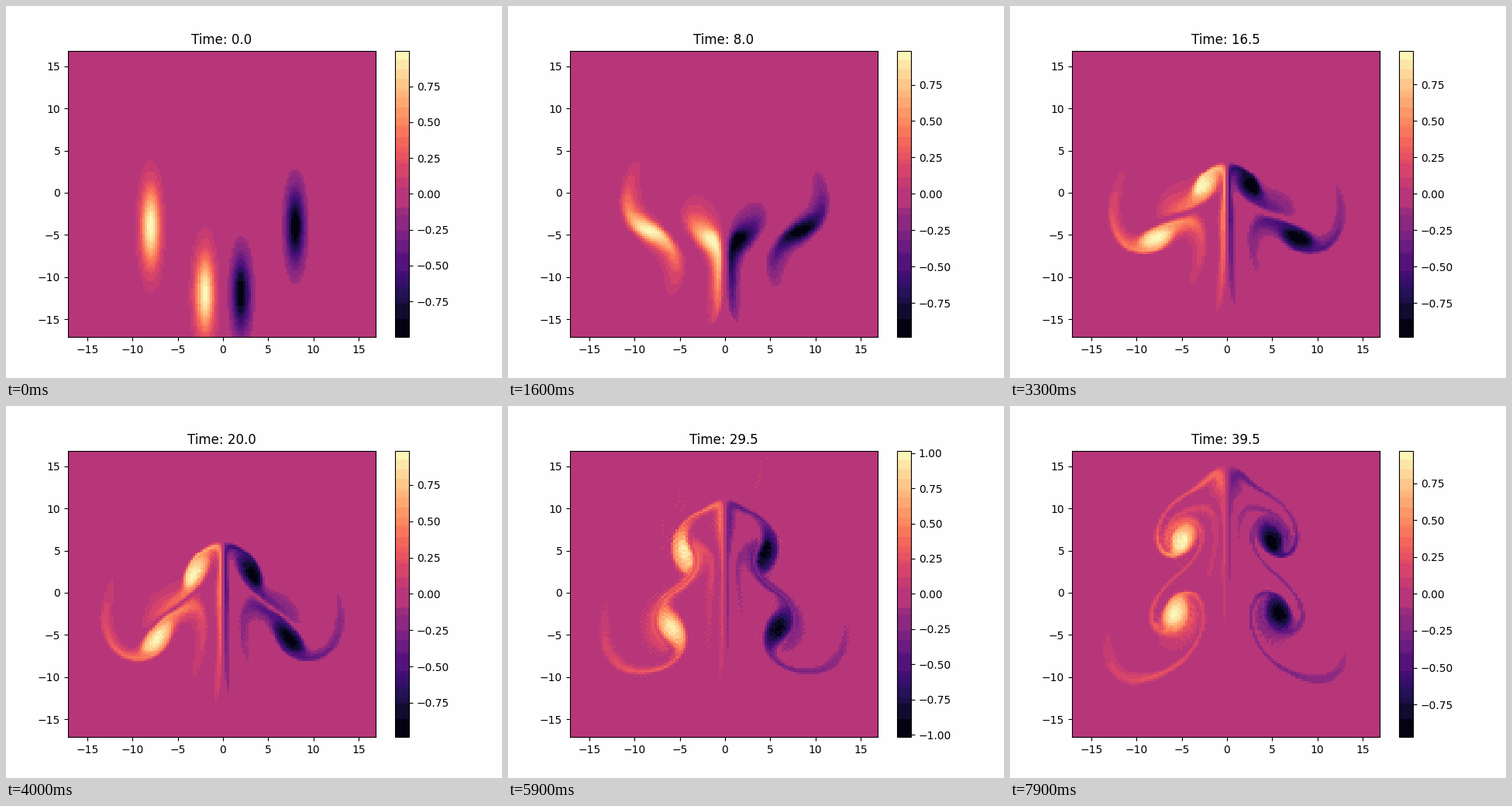
Recreate the animation shown at these times as a matplotlib script. Size 640 px wide and 480 px high, loop 8 s.

```python
import numpy as np
import matplotlib.pyplot as plt
from matplotlib.animation import FuncAnimation
from matplotlib.colors import ListedColormap

N, L = 128, 34.0
FRAMES, STEP, SUBSTEPS = 80, 0.5, 5
NU = 0.001
PAPER = "#fefefe"

x = np.linspace(-L / 2, L / 2, N, endpoint=False)
X, Y = np.meshgrid(x, x)
KX, KY = np.meshgrid(2 * np.pi * np.fft.rfftfreq(N, L / N),
                     2 * np.pi * np.fft.fftfreq(N, L / N))
K2 = KX**2 + KY**2
INV_K2 = np.divide(1, K2, out=np.zeros_like(K2), where=K2 > 0)


def vortex(x0, y0):
    return np.exp(-(X - x0)**2 - (Y - y0)**2 / 20)


def real(spec):
    return np.fft.irfft2(spec, s=(N, N))


def rate(w):
    """Vorticity equation: advection by the stream function plus diffusion."""
    psi = -w * INV_K2
    psi_x, psi_y = real(1j * KX * psi), real(1j * KY * psi)
    w_x, w_y = real(1j * KX * w), real(1j * KY * w)
    return np.fft.rfft2(psi_y * w_x - psi_x * w_y) - NU * K2 * w


def advance(w, dt):
    a = rate(w)
    b = rate(w + dt / 2 * a)
    c = rate(w + dt / 2 * b)
    d = rate(w + dt * c)
    return w + dt / 6 * (a + 2 * b + 2 * c + d)


def solve():
    start = (vortex(-8, -4) - vortex(8, -4)
             + vortex(-2, -12) - vortex(2, -12))
    fields, w = [start], np.fft.rfft2(start)
    for _ in range(FRAMES - 1):
        for _ in range(SUBSTEPS):
            w = advance(w, STEP / SUBSTEPS)
        fields.append(real(w))
    return fields


def banded_magma():
    """Magma reduced to flat bands of 3, 4 and 3 bits per channel."""
    rgb = plt.get_cmap("magma")(np.arange(256), bytes=True)[:, :3].astype(int)
    keys = (rgb[:, 0] >> 5) * 128 + (rgb[:, 1] >> 4) * 8 + (rgb[:, 2] >> 5)
    out = np.zeros((256, 3))
    for key in np.unique(keys):
        out[keys == key] = rgb[keys == key].mean(axis=0) // 1
    out[keys == keys[128]] = 182, 54, 121
    return ListedColormap(out / 255)


fields = solve()
fig, ax = plt.subplots(figsize=(6.4, 4.8), dpi=100, facecolor=PAPER)
mesh = ax.pcolormesh(X, Y, fields[0], cmap=banded_magma(), shading="nearest")
bar = fig.colorbar(mesh, ax=ax)
title = ax.set_title("Time: 0.0")


def draw(i):
    w = fields[i]
    mesh.set_array(w)
    top = np.abs(w).max()
    mesh.set_clim(-top, top)
    title.set_text(f"Time: {i * STEP:.1f}")
    return mesh, title


anim = FuncAnimation(fig, draw, frames=FRAMES, interval=100, repeat=True,
                     repeat_delay=0, blit=False)
plt.show()
```
